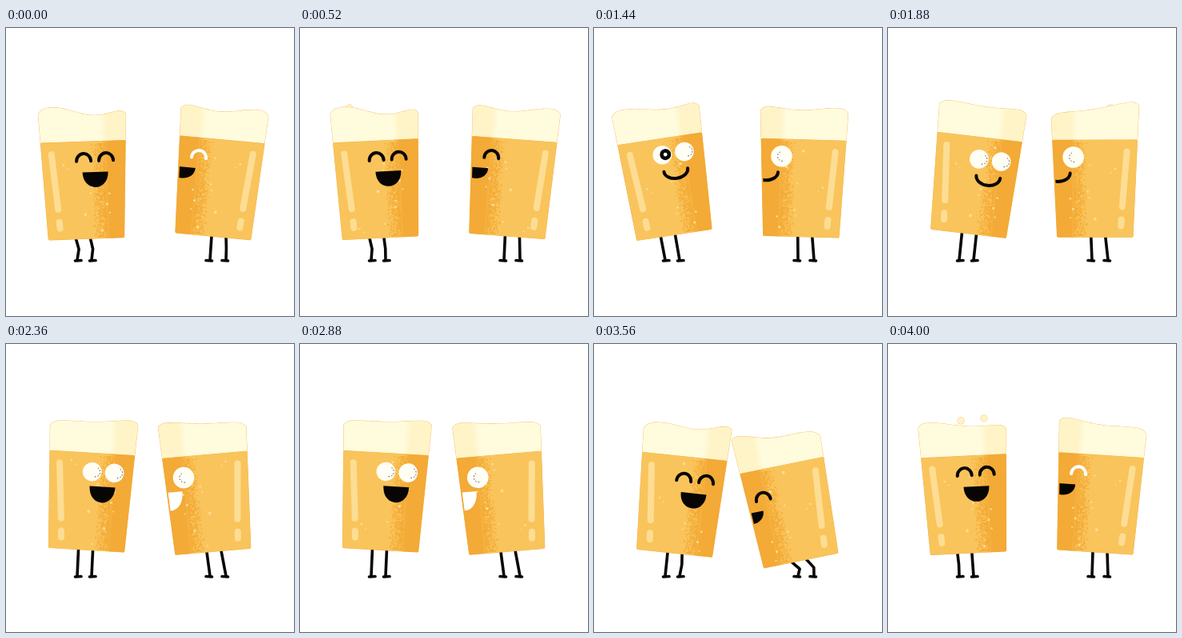
Write an HTML page with a canvas that moves like this. It is 360 by 360 pixels and loops after 4040 ms.

```html
<!DOCTYPE html>
<html lang="en">
<head>
<meta charset="utf-8">
<title>Two cheerful glasses</title>
<style>
html, body { margin: 0; width: 100%; height: 100%; overflow: hidden; background: #fff; }
canvas { display: block; width: 360px; height: 360px; }
</style>
</head>
<body>
<canvas id="stage"></canvas>
<script>
const LOOP = 4040, STEP = 40, TAU = Math.PI * 2;
const SMILE = 1160, TALK = 2080, LAUGH = 3400;
const INK = '#080604', BEER = '#f9c45b', AMBER = '#f3aa36', SHINE = '#fcdd93';
const FOAM = '#fffbdd', FOAM_SHADE = '#fff4c8', RIM = '#f0b04a';
const LIQUID = 120, BASE = 47.5, FLARE = 7.5 / 160;

const canvas = document.getElementById('stage');
const ctx = canvas.getContext('2d');
const dpr = window.devicePixelRatio || 1;
canvas.width = canvas.height = 360 * dpr;

// Keys: time, tilt in degrees, height of the base.
const left = {
  x: 100.5, mirror: 1, feet: [89, 107], hips: [-12, 6], swell: 1,
  eyes: [0, 28], eyeY: -100, eyeR: 11.8, look: 4, mouthX: 14, gape: [19, 20],
  keys: [[0, -2, 263.5], [SMILE, -2, 261], [1560, -10.5, 258], [1720, -9.5, 258],
    [1900, 7.3, 257], [2400, 3.4, 257.5], [3380, 3.2, 257.5], [3520, 6.2, 261.5],
    [3580, 6, 261.5], [3960, -3.6, 259.5], [LOOP, -2, 263.5]]
};
const right = {
  x: 258.8, mirror: -1, feet: [255, 275], hips: [-5, 13], swell: 0.4,
  eyes: [27], eyeY: -99, eyeR: 13.3, look: -1, mouthX: 46, gape: [14, 23],
  keys: [[0, 5.4, 260.5], [SMILE, 5, 260], [1420, 1.5, 261], [1760, 7, 261],
    [2020, -9, 262], [2400, -4.8, 259.5], [3380, -4.8, 259.5], [3540, -11.5, 271],
    [3960, 2, 260], [LOOP, 5.4, 260.5]]
};

// Start, first x, peak y, number of drops.
const bursts = [[280, 62, 82, 1], [740, 104, 81, 2], [1650, 278, 90, 1],
  [2000, 160, 56, 3], [3770, 91, 80, 2]];

function seeded(seed) {
  return () => {
    seed = (seed * 16807) % 2147483647;
    return seed / 2147483647;
  };
}

const rand = seeded(77);
const grain = Array.from({ length: 1000 }, () => ({
  x: 9 + 17 * Math.sqrt(rand()), h: rand() * LIQUID, size: 0.7 + rand() * 0.9
}));
const fizz = Array.from({ length: 11 }, () => ({
  x: -30 + rand() * 72, h: rand(), r: 0.8 + rand() * 1.2
}));

const ease = u => u * u * (3 - 2 * u);
const half = h => BASE + FLARE * h;

function between(keys, t, column) {
  const i = keys.findIndex(k => k[0] > t);
  const a = keys[i - 1], b = keys[i];
  return a[column] + (b[column] - a[column]) * ease((t - a[0]) / (b[0] - a[0]));
}

// Keyed sway plus two giggles of rocking at the start of the loop.
function tilt(g, time) {
  const t = (time + LOOP) % LOOP;
  const giggle = t < SMILE ? 1.4 * Math.sin(2 * TAU * t / SMILE) : 0;
  return between(g.keys, t, 1) + giggle;
}

function line(points, width, color) {
  ctx.beginPath();
  points.forEach(([x, y]) => ctx.lineTo(x, y));
  ctx.lineWidth = width;
  ctx.strokeStyle = color;
  ctx.stroke();
}

function arc(x, y, rx, ry, from, to, width) {
  ctx.beginPath();
  ctx.ellipse(x, y, rx, ry, 0, from, to);
  ctx.lineWidth = width;
  ctx.stroke();
}

function disc(x, y, r, color) {
  ctx.beginPath();
  ctx.arc(x, y, r, 0, TAU);
  ctx.fillStyle = color;
  ctx.fill();
}

function solid(path, color, shade) {
  const paint = ctx.createLinearGradient(22, 0, 30, 0);
  paint.addColorStop(0, color);
  paint.addColorStop(1, shade);
  ctx.lineWidth = 3.6;
  ctx.strokeStyle = RIM;
  ctx.stroke(path);
  ctx.lineWidth = 3;
  ctx.strokeStyle = ctx.fillStyle = paint;
  ctx.stroke(path);
  ctx.fill(path);
}

function bodyPath() {
  const p = new Path2D();
  p.moveTo(-half(0) + 1.5, -1.5);
  p.lineTo(-half(LIQUID) + 1.5, -LIQUID);
  p.lineTo(half(LIQUID) - 1.5, -LIQUID);
  p.lineTo(half(0) - 1.5, -1.5);
  p.closePath();
  return p;
}

// slosh lifts the inner side and lowers the outer one.
function foamPath(slosh, dip, swell) {
  const p = new Path2D(), w = half(LIQUID) - 1.5;
  p.moveTo(-w, -LIQUID);
  for (let i = 0; i <= 40; i++) {
    const u = i / 40;
    const corner = 5 * (Math.exp(-u * 26) + Math.exp((u - 1) * 26));
    const h = 41 + slosh * (u - 0.5) - dip * Math.sin(Math.PI * u) ** 2 +
      swell * Math.sin(TAU * u) - corner;
    p.lineTo((2 * u - 1) * (w + FLARE * h), -LIQUID - h);
  }
  p.lineTo(w, -LIQUID);
  p.closePath();
  return p;
}

function openMouth(x, y, r, depth, color) {
  ctx.beginPath();
  ctx.moveTo(x - r, y);
  ctx.lineTo(x + r, y);
  ctx.bezierCurveTo(x + r, y + depth * 1.33, x - r, y + depth * 1.33, x - r, y);
  ctx.fillStyle = color;
  ctx.fill();
}

function openEye(x, y, r, look, dark) {
  disc(x, y, r, '#fffef5');
  if (dark) {
    disc(x + look, y, 7, INK);
    disc(x + look, y, 2.4, '#fff');
  } else {
    ctx.setLineDash([0.6, 3]);
    arc(x + look, y, 6, 6, -1, 2, 0.8);
    ctx.setLineDash([]);
  }
}

function face(g, t, dx, dy) {
  const happy = t < SMILE || t >= LAUGH;
  const pale = g === right && (t < 280 || t >= 3920);
  const mouthX = g.mouthX + dx;

  g.eyes.forEach((eye, i) => {
    const x = eye + dx, y = g.eyeY + dy;
    ctx.strokeStyle = pale ? '#fff' : INK;
    if (happy) arc(x, y + 4, 9, 9.5, Math.PI, TAU, 4);
    else openEye(x, y, g.eyeR, g.look, g === left && i === 0 && t < 1600);
  });

  ctx.strokeStyle = INK;
  if (t >= SMILE && t < TALK) {
    arc(mouthX, dy - 79, 15, 10.5, 0, Math.PI, 4);
  } else {
    const color = g === right && !happy ? '#fff' : INK;
    openMouth(mouthX, dy - 82, 16, g.gape[happy ? 0 : 1], color);
  }
}

function legs(g, angle, y) {
  g.feet.forEach((foot, i) => {
    const hip = g.x + g.hips[i] + 0.6 * angle;
    const hipY = y + (hip - g.x) * Math.sin(angle * TAU / 360) - 1;
    const len = Math.hypot(foot - hip, 290 - hipY);
    const bend = Math.sqrt(Math.max(0, 29 * 29 - len * len)) / 3.5;
    line([[hip, hipY], [(hip + foot) / 2 + bend, (hipY + 290) / 2], [foot, 290]], 3.6, INK);
    line([[foot - 2.5 * g.mirror, 291], [foot + 5 * g.mirror, 290.5]], 3.6, INK);
  });
}

function glass(g, t) {
  const angle = tilt(g, t), y = between(g.keys, t, 2);
  const inward = angle * g.mirror;
  const speed = (tilt(g, t + 20) - tilt(g, t - 20)) * g.mirror * 25;
  legs(g, angle, y);

  ctx.save();
  ctx.translate(g.x, y);
  ctx.rotate(angle * TAU / 360);
  ctx.scale(g.mirror, 1);

  const wave = Math.cos(TAU * t / 520);
  const slosh = 2 + 1.1 * inward - 0.2 * speed;
  solid(foamPath(slosh, 4 + 2 * wave, (2 + 2 * wave) * g.swell), FOAM, FOAM_SHADE);

  const body = bodyPath();
  solid(body, BEER, AMBER);
  ctx.clip(body);
  ctx.fillStyle = AMBER;
  grain.forEach(s => ctx.fillRect(s.x, -s.h, s.size, s.size));
  line([[-40, -107], [-34, -38]], 8, SHINE);
  line([[-33, -22], [-32.4, -14]], 8, SHINE);
  fizz.forEach(b => {
    const h = (b.h + 2 * t / LOOP) % 1;
    disc(b.x, -6 - h * 108, b.r, SHINE);
  });
  const lean = Math.max(0, inward);
  face(g, t, 0.35 * lean, 1.2 * Math.max(0, lean - 1) - 1);
  ctx.restore();
}

function splash([start, x, peak, count], t) {
  for (let i = 0; i < count; i++) {
    const p = (t - start - 10 * i) / 260;
    if (p < 0 || p > 1) continue;
    const y = 107 - (107 - peak) * 4 * p * (1 - p);
    disc(x + 29 * i, y, 4.5, '#f3c573');
    disc(x + 29 * i, y, 4, '#fff3c6');
  }
}

function draw() {
  const t = Math.floor(performance.now() % LOOP / STEP) * STEP;
  ctx.setTransform(dpr, 0, 0, dpr, 0, 0);
  ctx.fillStyle = '#fff';
  ctx.fillRect(0, 0, 360, 360);
  ctx.lineCap = ctx.lineJoin = 'round';
  bursts.forEach(b => splash(b, t));
  glass(left, t);
  glass(right, t);
  requestAnimationFrame(draw);
}
draw();
</script>
</body>
</html>
```
